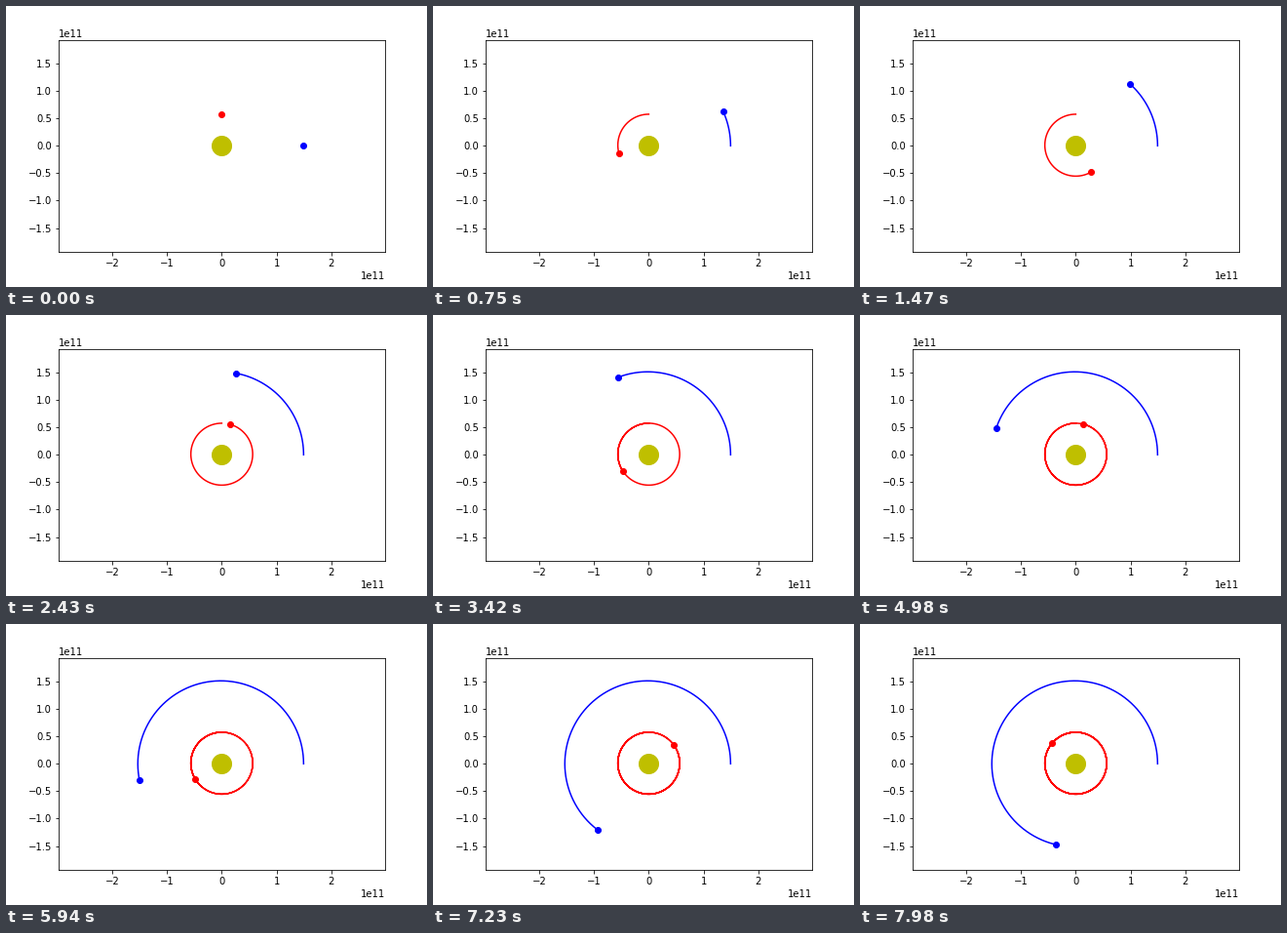
Recreate the animation shown at these times as a matplotlib script. Size 432x288 px, loop 8000 ms.

```python
import numpy as np
import matplotlib.pyplot as plt
from matplotlib.animation import FuncAnimation

UNIT = 1e11          # metres per axis unit
LOOP, TICK = 8000, 20
STEP = 30            # ms between two plotted positions
N = LOOP // STEP + 1


def orbit(a, e, rate, start, at_perihelion):
    """Kepler orbit sampled once per step; rate is degrees of mean motion."""
    phase = 0 if at_perihelion else np.pi
    mean = np.radians(rate) * np.arange(N) + phase
    ecc = mean.copy()
    for _ in range(8):
        ecc -= (ecc - e * np.sin(ecc) - mean) / (1 - e * np.cos(ecc))
    u = a * (np.cos(ecc) - e)
    v = a * np.sqrt(1 - e * e) * np.sin(ecc)
    turn = np.radians(start) - phase
    x = u * np.cos(turn) - v * np.sin(turn)
    y = u * np.sin(turn) + v * np.cos(turn)
    return x * UNIT, y * UNIT


fig = plt.figure(figsize=(6, 4), dpi=72, facecolor="white")
fig.subplots_adjust(left=0.125, right=0.9, bottom=0.125, top=0.88)
ax = fig.add_subplot()
half_w = 2.979 * UNIT
ax.set_xlim(-half_w, half_w)
ax.set_ylim(-half_w * 217.44 / 334.8, half_w * 217.44 / 334.8)

ax.plot([0], [0], "yo", markersize=20)

bodies = []
for color, path in (
    ("b", orbit(1.5134, 0.0128, 0.9686, 0, True)),
    ("r", orbit(0.5648, 0.02, 4.249, 90, False)),
):
    trail, = ax.plot([], [], color + "-", linewidth=1.5)
    dot, = ax.plot([], [], color + "o", markersize=6)
    bodies.append((path, trail, dot))


def draw(i):
    n = (i * TICK + TICK // 2) // STEP
    artists = []
    for (x, y), trail, dot in bodies:
        trail.set_data(x[:n + 1], y[:n + 1])
        dot.set_data(x[n:n + 1], y[n:n + 1])
        artists += [trail, dot]
    return artists


def init():
    return draw(0)


anim = FuncAnimation(fig, draw, frames=LOOP // TICK, init_func=init,
                     interval=TICK, repeat=True, repeat_delay=0)
plt.show()
```
